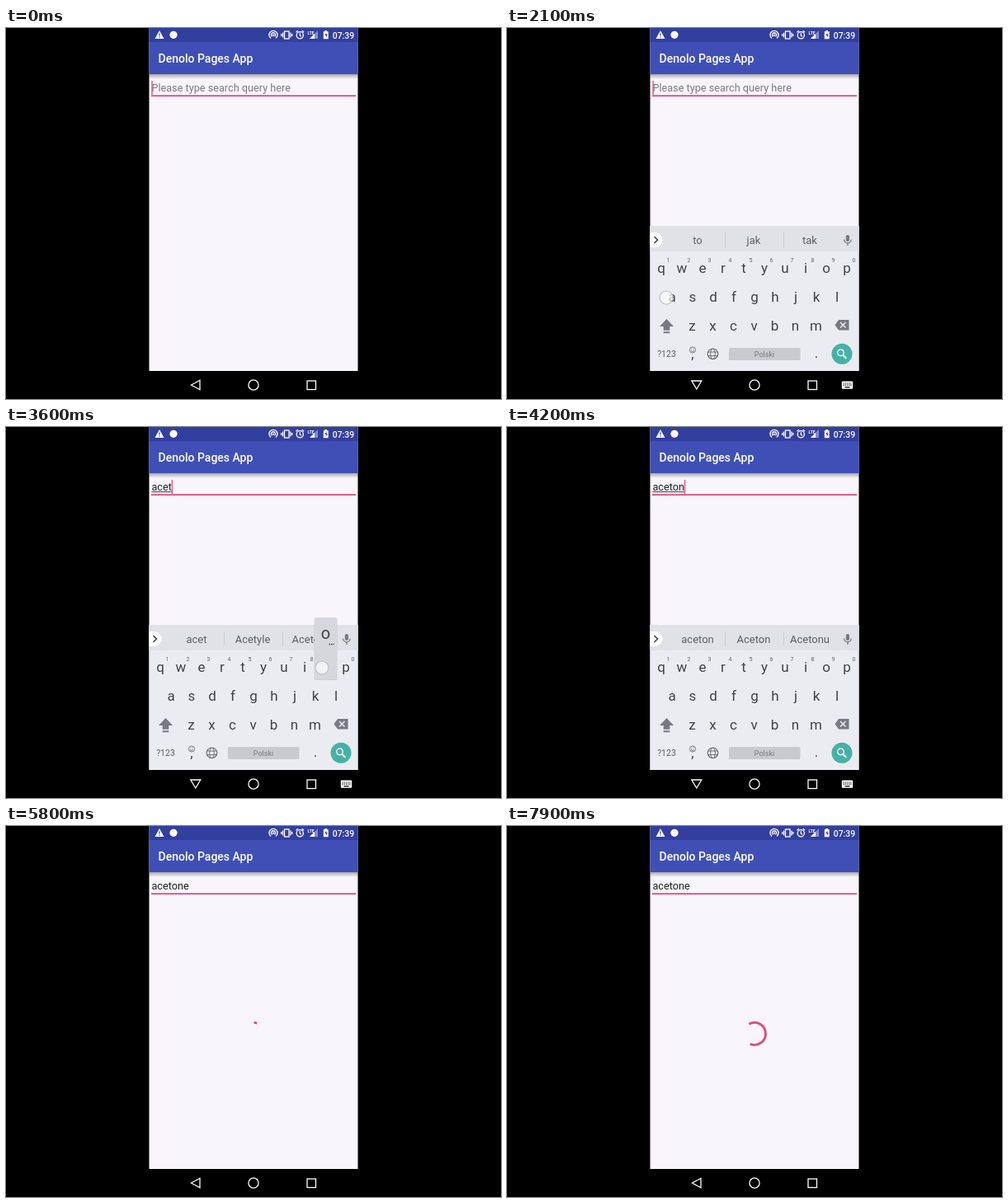
Animation, 600 px wide and 450 px high, one loop 8 s. Source, as an HTML page:

```html
<!DOCTYPE html>
<html lang="en">
<head>
<meta charset="utf-8">
<title>Book search</title>
<style>
  html, body { margin: 0; width: 100%; height: 100%; overflow: hidden; background: #000; }
  svg { display: block; width: 600px; height: 450px; font-family: Roboto, Arial, sans-serif; }
  .mid { text-anchor: middle; }
  .key { font-size: 17px; fill: #40434b; text-anchor: middle; }
  .tiny { font-size: 7px; fill: #62656d; text-anchor: middle; }
  .word { font-size: 13px; fill: #5b6069; text-anchor: middle; }
  .line { fill: none; stroke: #fff; stroke-width: 1.3; }
</style>
</head>
<body>
<svg viewBox="0 0 600 450">
  <defs>
    <linearGradient id="shade" x2="0" y2="1">
      <stop offset="0" stop-color="#000" stop-opacity=".32"/>
      <stop offset="1" stop-color="#000" stop-opacity="0"/>
    </linearGradient>
    <clipPath id="screen"><rect x="173.5" width="253" height="416"/></clipPath>
  </defs>
  <rect width="600" height="450"/>
  <g clip-path="url(#screen)">
    <rect x="173" width="254" height="416" fill="#f9f6fb"/>
    <rect x="173" y="56" width="254" height="6" fill="url(#shade)"/>
    <rect x="173" y="16" width="254" height="40" fill="#3f4fb6"/>
    <rect x="173" width="254" height="17" fill="#333f9f"/>
    <text x="184.5" y="42" font-size="14" font-weight="500" fill="#fff">Denolo Pages App</text>

    <!-- status bar -->
    <g fill="#fff">
      <path d="M186 3l5.5 10h-11z"/>
      <path d="M186 6.5v3M186 10.5v1.2" stroke="#333f9f" stroke-width="1.2"/>
      <circle cx="203" cy="8.3" r="4.6"/>
      <g class="line" stroke-width="1.1">
        <path d="M321 12.4a5 5 0 1 1 6 0M322.4 10.4a2.6 2.6 0 1 1 3.2 0"/>
        <rect x="337.5" y="4" width="5.5" height="9"/>
        <path d="M335.6 5.5v6M344.9 5.5v6M333.8 7v3M346.7 7v3"/>
        <circle cx="356.3" cy="8.8" r="4.1"/>
        <path d="M356.3 6.3v2.8l1.7 1M351.5 5.3l2.4-2M361.1 5.3l-2.4-2"/>
      </g>
      <circle cx="324" cy="8.8" r="1.2"/>
      <text x="365.5" y="7.5" font-size="5" font-weight="700">LTE</text>
      <path d="M378 3v10h-10z" opacity=".4"/>
      <path d="M374 7v6h-6z"/>
      <path d="M384.8 4.2h1.6v-1.2h2.6v1.2h1.7v9h-5.9z"/>
      <path d="M388.4 5.5l-2 3.6h1.4v2.6l2-3.7h-1.4z" fill="#333f9f"/>
      <text x="395.8" y="12.5" font-size="10.4" font-weight="500">07:39</text>
    </g>

    <!-- search field -->
    <rect x="176" y="81.4" width="248" height="1.7" fill="#dc3f78"/>
    <text id="query" x="176.4" y="77" font-size="12.7"></text>
    <rect id="under" x="176.4" y="78.2" height="1" fill="#333"/>
    <rect id="cursor" y="64" width="1.4" height="17" fill="#e0558a"/>
    <path id="arc" fill="none" stroke="#e9437f" stroke-width="2.8" stroke-linecap="square"/>

    <!-- keyboard -->
    <g id="board">
      <rect x="173" y="240" width="254" height="176" fill="#ebecf1"/>
      <rect x="173" y="240" width="254" height="31" fill="#e1e2e7"/>
      <path d="M173 248h6.5a9 9 0 0 1 0 18h-6.5z" fill="#fff"/>
      <path d="M178.5 253l4 4-4 4" fill="none" stroke="#44474f" stroke-width="1.6"/>
      <path d="M264.5 248v18M335.5 248v18" stroke="#cfd0d6"/>
      <text class="word" x="231" y="262"></text>
      <text class="word" x="299" y="262"></text>
      <text class="word" x="367" y="262"></text>
      <rect x="410.8" y="251" width="4.2" height="8" rx="2.1" fill="#777a82"/>
      <path d="M408.6 256.5a4.3 4.3 0 0 0 8.6 0M412.9 261v3" fill="none" stroke="#777a82" stroke-width="1.3"/>
      <g id="keys"></g>
      <path d="M193.5 353l8.5 9h-4.7v4.8h-7.6v-4.8h-4.7zM189.7 368.3h7.6v2h-7.6z" fill="#777a82"/>
      <path d="M402 354h12.5v12.5h-12.5l-4.5-6.2z" fill="#777a82"/>
      <path d="M404 357l6.5 6.5M410.5 357l-6.5 6.5" stroke="#ebecf1" stroke-width="1.5"/>
      <text class="mid" x="193.5" y="399" font-size="10.5" fill="#5b6069">?123</text>
      <g fill="none" stroke="#6c7078">
        <circle cx="225" cy="390.5" r="3.6" stroke-width=".9"/>
        <path d="M223 391.4q2 2.2 4 0M223.4 389.2h1M225.8 389.2h1" stroke-width=".9"/>
        <circle cx="249.5" cy="395.3" r="6.3" stroke-width="1.2"/>
        <ellipse cx="249.5" cy="395.3" rx="2.8" ry="6.3"/>
        <path d="M243.8 393h11.4M243.8 397.6h11.4"/>
      </g>
      <text class="key" x="225" y="401" font-size="14">,</text>
      <rect x="269" y="388" width="86.5" height="15" rx="1.5" fill="#c8cad0"/>
      <text class="mid" x="312" y="398.8" font-size="9" fill="#777a82">Polski</text>
      <text class="key" x="375" y="400">.</text>
      <circle cx="406" cy="395.3" r="12.5" fill="#46b1a7"/>
      <circle cx="404.5" cy="393.8" r="3.8" class="line" stroke-width="1.7"/>
      <path d="M407.3 396.7l4 4" stroke="#fff" stroke-width="2"/>
    </g>
    <g id="popup">
      <rect x="-14" y="-59.5" width="28" height="75.5" rx="2" fill="#000" opacity=".12"/>
      <rect x="-13.5" y="-60" width="27" height="75" rx="2" fill="#d6d7dd"/>
      <text class="key" y="-34" style="font-size:20px"></text>
      <path d="M4 -27.5h1.4M6.4 -27.5h1.4M8.8 -27.5h1.4" stroke="#40434b" stroke-width="1.3"/>
    </g>
    <circle id="touch" r="8" fill="#fff" fill-opacity=".75" stroke="#b9b7c6" stroke-width="1.2"/>
  </g>

  <!-- navigation bar -->
  <g class="line">
    <path id="back" d="M224.5 433l10.5-5.7v11.4z"/>
    <path id="down" d="M223.8 428h12l-6 10z"/>
    <circle cx="300" cy="433" r="6.1"/>
    <rect x="365" y="428" width="10.5" height="10.5"/>
  </g>
  <g id="switcher">
    <rect x="405.8" y="428.5" width="13.4" height="9.2" rx="1" fill="#fff"/>
    <path d="M407.5 431h10M407.5 433.2h10" stroke="#000" stroke-width="1.2" stroke-dasharray="1.2 1"/>
    <path d="M409.5 435.7h6" stroke="#000" stroke-width="1.2"/>
  </g>
</svg>
<script>
const LOOP = 8000, STEP = 100, SPIN_START = 5750;
const $ = id => document.getElementById(id);
const svgText = (cls, x, y, s) => `<text class="${cls}" x="${x}" y="${y}">${s}</text>`;

// letter rows: letters, first centre x, baseline
const rows = [["qwertyuiop", 187, 297], ["asdfghjkl", 200, 332], ["zxcvbnm", 224.5, 367]];
const place = {};
let keyMarkup = "";
rows.forEach(([letters, x0, y], row) => [...letters].forEach((ch, i) => {
  const x = x0 + i * 25;
  place[ch] = { x, y: y - 6 };
  keyMarkup += svgText("key", x, y, ch);
  if (!row) keyMarkup += svgText("tiny", x + 8.5, 283.5, (i + 1) % 10);
}));
$("keys").innerHTML = keyMarkup;

// key presses: finger down, popup shown, letter typed
const presses = [
  [2100, 2200, 2300, "a"], [2600, 2700, 2800, "c"], [3000, 3100, 3200, "e"],
  [3200, 3300, 3400, "t"], [3600, 3600, 3700, "o"], [4000, 4100, 4200, "n"],
  [4600, 4700, 4800, "e"]
];
const hints = [
  ["to", "jak", "tak"], ["a", "ale", "aby"], ["ac", "Ach", "Act"],
  ["ace", "Acetyl", "Aceton"], ["acet", "Acetyle", "Aceton"],
  ["aceto", "Aceton", "Acetonu"], ["aceton", "Aceton", "Acetonu"],
  ["acetone", "Acetony", "Acetonem"]
];
// other touches: from, to, x, y, opacity
const taps = [[1200, 1400, 301, 69, .7], [1400, 1500, 301, 69, .3], [5200, 5400, 404, 395, .8]];
const cursorOff = [[200, 700], [1600, 2100], [4700, 4800], [5300, LOOP]];
// keyboard: time, drop, opacity
const slide = [[0, 176, 0], [1500, 60, .45], [1600, 18, .85], [1700, 0, 1],
  [5400, 25, .75], [5500, 80, .35], [5600, 176, 0]];

const within = (t, [a, b]) => t >= a && t < b;
const show = (el, on) => el.setAttribute("visibility", on ? "visible" : "hidden");
const words = document.querySelectorAll(".word");

function ease(x, x1, x2) {
  // cubic curve with control heights 0 and 1
  let lo = 0, hi = 1, u;
  for (let i = 0; i < 24; i++) {
    u = (lo + hi) / 2;
    const v = 1 - u;
    if (3 * v * v * u * x1 + 3 * v * u * u * x2 + u ** 3 < x) lo = u; else hi = u;
  }
  return u * u * (3 - 2 * u);
}

function arcPath(s) {
  const p = s % 1333 / 1333;
  const turn = s * 720 / 6665 + p * 90;
  const tail = p < .5 ? 0 : 270 * ease(p * 2 - 1, .4, .2);
  const head = p < .5 ? 270 * ease(p * 2, .4, .2) : 270;
  const end = Math.max(head, tail + 3.6);
  const at = deg => {
    const a = (turn + deg) * Math.PI / 180;
    return `${300 + 13.5 * Math.sin(a)} ${252 - 13.5 * Math.cos(a)}`;
  };
  return `M${at(tail)}A13.5 13.5 0 ${end - tail > 180 ? 1 : 0} 1 ${at(end)}`;
}

function draw(t) {
  const count = presses.filter(p => t >= p[2]).length;
  const typed = presses.slice(0, count).map(p => p[3]).join("");
  const query = $("query");
  query.textContent = typed || "Please type search query here";
  query.setAttribute("fill", typed ? "#222" : "#7d7a81");
  const width = typed ? query.getComputedTextLength() : 0;
  $("under").setAttribute("width", t < 5400 ? width : 0);
  $("cursor").setAttribute("x", 176.3 + width);
  show($("cursor"), !cursorOff.some(r => within(t, r)));
  words.forEach((w, i) => w.textContent = hints[count][i]);

  const [, drop, alpha] = slide.filter(s => t >= s[0]).pop();
  $("board").setAttribute("transform", `translate(0 ${drop})`);
  $("board").setAttribute("opacity", alpha);

  const popped = presses.find(p => within(t, [p[1], p[2]]));
  show($("popup"), popped);
  if (popped) {
    const { x, y } = place[popped[3]];
    $("popup").setAttribute("transform", `translate(${x + .5} ${y})`);
    $("popup").querySelector("text").textContent = popped[3];
  }

  const held = presses.find(p => within(t, [p[0], p[2]]));
  const tap = held
    ? [0, 0, place[held[3]].x - (held[3] === "a" ? 7 : 4), place[held[3]].y + 1, .9]
    : taps.find(r => within(t, r));
  show($("touch"), tap);
  if (tap) {
    $("touch").setAttribute("cx", tap[2]);
    $("touch").setAttribute("cy", tap[3]);
    $("touch").setAttribute("opacity", tap[4]);
  }

  const open = within(t, [1300, 5500]);
  show($("back"), !open);
  show($("down"), open);
  show($("switcher"), open);

  const spinning = t >= SPIN_START;
  show($("arc"), spinning);
  if (spinning) $("arc").setAttribute("d", arcPath(t - SPIN_START));
}

const start = performance.now();
function tick() {
  const t = (performance.now() - start) % LOOP;
  draw(Math.floor(t / STEP) * STEP);
  requestAnimationFrame(tick);
}
tick();
</script>
</body>
</html>
```
